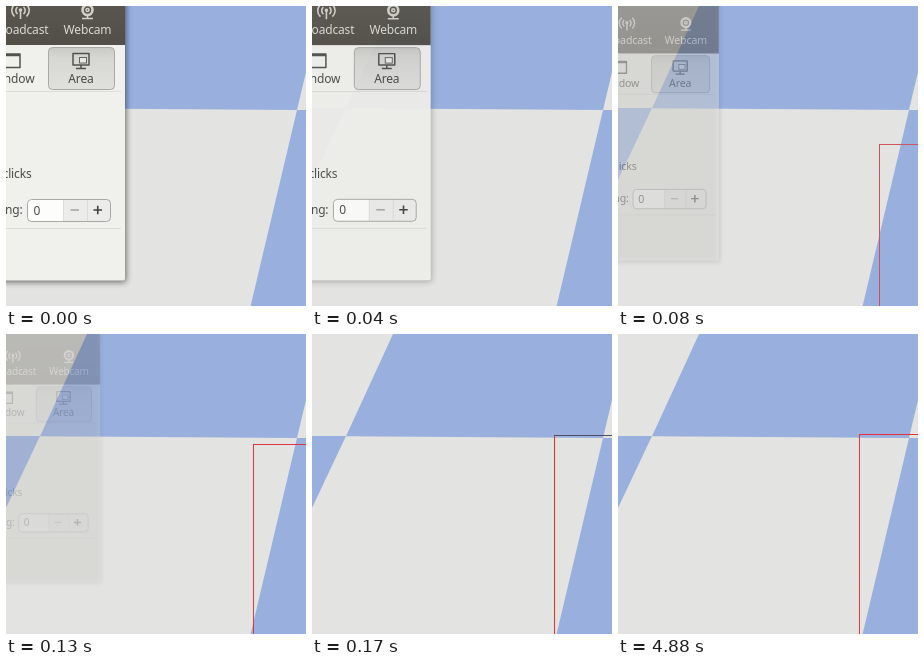
Animation of 300 by 300 pixels, one loop 8 s. Source, as an HTML page:

```html
<!DOCTYPE html>
<html lang="en">
<head>
<meta charset="utf-8">
<title>Area picker</title>
<style>
  html, body { margin: 0; width: 100%; height: 100%; overflow: hidden; background: #e3e3e1; }
  svg { display: block; width: 100vw; height: 100vh; }
  text { font: 12px "Noto Sans", "Open Sans", sans-serif; letter-spacing: -.15px; fill: #4a4a46; }
  .end { text-anchor: end; }
  .mid { text-anchor: middle; }
  .bar text { fill: #dcdad2; }
  .bar path, .bar circle { fill: none; stroke: #d2d0c8; stroke-width: 1.6; }
  .bar .lens { stroke-width: 2.6; }
  .rule { stroke: #dcdcd8; }
  .frame { fill: none; stroke: #a9a9a4; }
  .icon { fill: none; stroke: #51514d; stroke-width: 1.5; stroke-linejoin: round; }
</style>
</head>
<body>
<svg viewBox="0 0 300 300">
  <defs>
    <linearGradient id="dark" x2="0" y2="1">
      <stop stop-color="#5c5a52"/><stop offset="1" stop-color="#514f47"/>
    </linearGradient>
    <linearGradient id="pressed" x2="0" y2="1">
      <stop stop-color="#c9c9c5"/><stop offset=".25" stop-color="#d6d6d2"/><stop offset="1" stop-color="#e0e0dc"/>
    </linearGradient>
    <filter id="blur" filterUnits="userSpaceOnUse" x="-80" y="-60" width="230" height="360">
      <feGaussianBlur stdDeviation="3"/>
    </filter>
  </defs>

  <rect width="300" height="300" fill="#e3e3e1"/>
  <path fill="#99b0df" d="M81 0H300V66L291 104L34 102.3ZM0 102H34L0 174ZM291 104H300V300H244.600Z"/>

  <g id="dialog">
    <rect id="shadow" x="-60" y="-40" width="180" height="316" filter="url(#blur)"/>
    <g id="panel">
      <rect x="-60" y="-40" width="179" height="314.500" rx="2" fill="#f0f0ec"/>
      <g class="bar">
        <rect x="-60" y="-24" width="179" height="63" fill="url(#dark)"/>
        <path d="M14.500 4V13M11.500 8a4.500 4.500 0 0 1 0-7M17.500 8a4.500 4.500 0 0 0 0-7M8.500 10.500a8 8 0 0 1 0-12M20.500 10.500a8 8 0 0 0 0-12"/>
        <circle cx="14.500" cy="4" r="1"/>
        <circle class="lens" cx="81.500" cy="4" r="5"/>
        <circle cx="81.500" cy="4" r="1.500"/>
        <path d="M81.500 9.500V12M76 12.500H87"/>
        <text class="end" x="42.500" y="28">Broadcast</text>
        <text class="mid" x="81.500" y="28">Webcam</text>
      </g>

      <path class="icon" d="M-4 48H14V61.500H-4ZM-4 49.500H14"/>
      <text class="end" x="28.500" y="77">Window</text>
      <rect class="frame" x="42.500" y="41.500" width="66" height="42" rx="4" style="fill:url(#pressed)"/>
      <path class="icon" d="M67 47.500H83V59H67ZM75 59V62M70 62.500H80"/>
      <rect x="73.500" y="51.500" width="7" height="5.500" fill="#eaeae6" stroke="#64645f"/>
      <text class="mid" x="75" y="77">Area</text>

      <path class="rule" d="M-60 85.500H115M-60 222.500H115"/>
      <text class="end" x="25.500" y="172">Mouse clicks</text>
      <text class="end" x="16.500" y="208">Spacing:</text>
      <rect x="21" y="193" width="84" height="22" rx="4" fill="#ececea"/>
      <path fill="#fdfdfc" d="M25 193H57V215H25Q21 215 21 211V197Q21 193 25 193Z"/>
      <path class="rule" d="M57.500 193V215M81.500 193V215"/>
      <rect class="frame" x="21.500" y="193.500" width="83" height="22" rx="4"/>
      <text x="27.500" y="208.500">0</text>
      <path d="M64.500 204H73" stroke="#a3a39e" stroke-width="1.500"/>
      <path d="M87.500 204H96M91.750 199.750V208.250" stroke="#40403c" stroke-width="1.600"/>
    </g>
  </g>

  <g id="selection">
    <path id="side"/>
    <path id="top"/>
  </g>
</svg>
<script>
  const LOOP = 8000;
  const PIVOT = [-32, 109.500];
  // Each pose holds until the next start time.
  const poses = [
    { at: 0, scale: 1, alpha: 1, shade: .55 },
    { at: 40, scale: .998, alpha: .95, shade: .25 },
    { at: 80, scale: .88, alpha: .42, shade: .12 },
    { at: 130, scale: .836, alpha: .2, shade: .07 },
    { at: 170, scale: .82, alpha: 0, shade: 0 }
  ];
  const corners = [
    { at: 80, x: 261.5, y: 138.5, side: '#d2505c', top: '#cc5560' },
    { at: 130, x: 247.5, y: 110.5, side: '#dc3843', top: '#dc3843' },
    { at: 170, x: 242.5, y: 101.5, side: '#f22b30', top: '#4c5063' },
    { at: 210, x: 241.5, y: 100.5, side: '#e8383f', top: '#e8303a' }
  ];
  const $ = id => document.getElementById(id);
  const latest = (list, t) => list.findLast(item => item.at <= t);

  function stroke(id, d, color) {
    $(id).setAttribute('d', d);
    $(id).setAttribute('stroke', color);
  }

  function draw(now) {
    const t = now % LOOP;
    const { scale, alpha, shade } = latest(poses, t);
    const shift = PIVOT.map(v => v * (1 - scale));
    $('dialog').setAttribute('transform', `translate(${shift}) scale(${scale})`);
    $('panel').setAttribute('opacity', alpha);
    $('shadow').setAttribute('opacity', shade);

    const corner = latest(corners, t);
    $('selection').setAttribute('visibility', corner ? 'visible' : 'hidden');
    if (corner) {
      const { x, y, side, top } = corner;
      stroke('side', `M${x} ${y}V300`, side);
      stroke('top', `M${x - .5} ${y}H300`, top);
    }
  }

  function tick() {
    draw(performance.now());
    requestAnimationFrame(tick);
  }
  tick();
</script>
</body>
</html>
```
